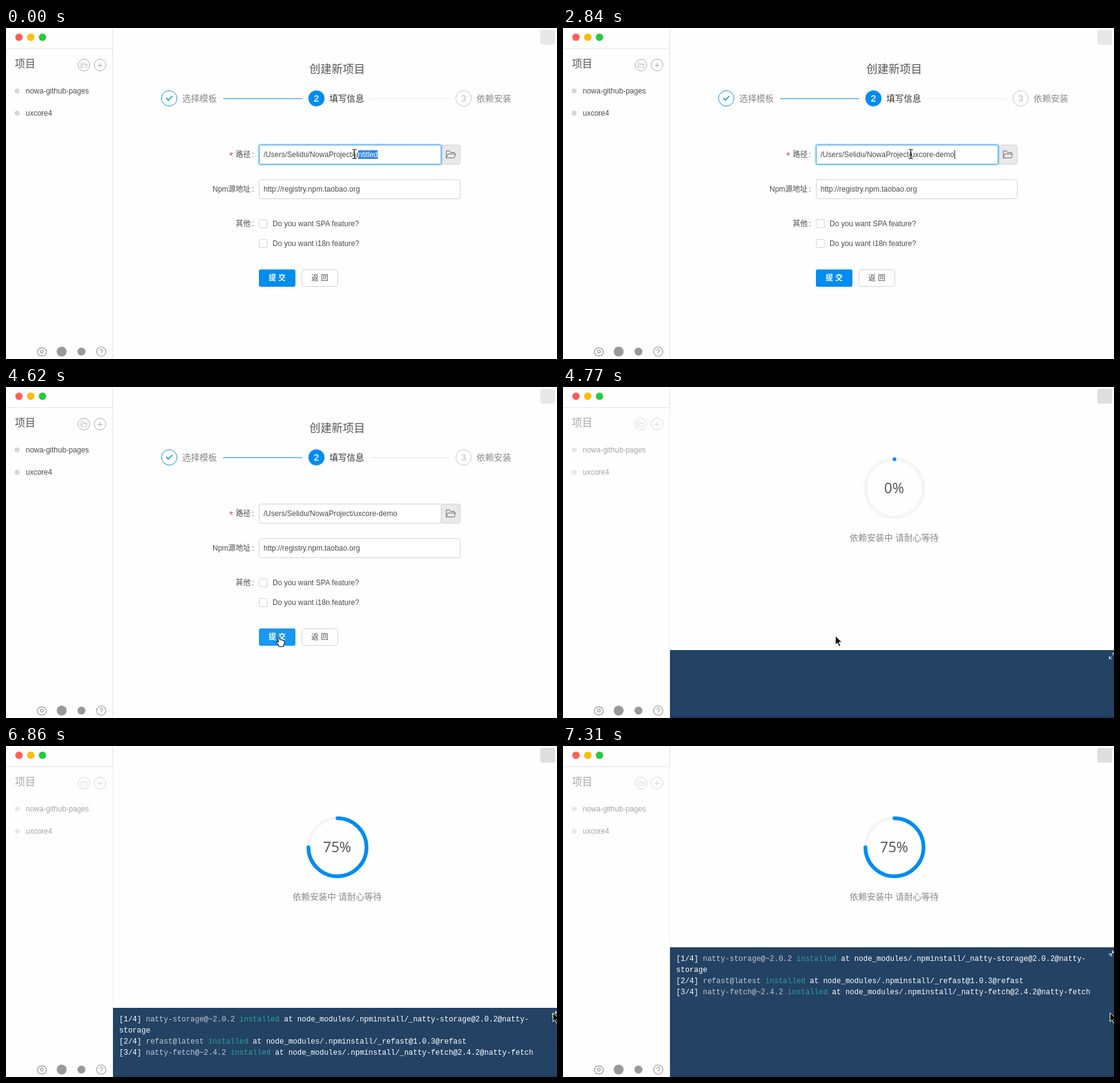
Write an HTML page that moves like this. It is 891 px wide and 536 px high and loops after 8000 ms.

```html
<!DOCTYPE html>
<html lang="zh">
<head>
<meta charset="utf-8">
<title>创建新项目</title>
<style>
  html, body { margin: 0; width: 100%; height: 100%; overflow: hidden; background: #fefefe; }
  svg { display: block; width: 100%; height: 100%; }
  text { font: 12px "Liberation Sans", "Noto Sans CJK SC", "Noto Sans CJK", sans-serif; fill: #4c4c4c; white-space: pre; }
  .step { font-size: 14px; fill: #888; }
  .num { font-size: 15px; text-anchor: middle; }
  .mid { text-anchor: middle; }
  .log, .log text { font: 12px "Liberation Mono", monospace; fill: #fff; }
  .log .pkg { fill: #c3c8cd; }
  .log .ok { fill: #35a095; }
  .line { fill: none; stroke-linecap: round; stroke-linejoin: round; }
  .box { fill: #fff; stroke: #d2d2d2; }
</style>
</head>
<body>
<svg viewBox="0 0 891 536">
  <defs>
    <path id="folder" class="line" d="M-7 5.5V-5.5H-2L-.5 -3H6V-.5M-7 5.5L-4.5 -.5H8L6 5.5Z"/>
  </defs>
  <rect width="891" height="536" fill="#fefefe"/>

  <!-- sidebar -->
  <path d="M0 33.5H172.5V0" fill="none" stroke="#e4e4e4"/>
  <circle cx="21" cy="15" r="6" fill="#ff5f57"/>
  <circle cx="40" cy="15" r="6" fill="#ffbd05"/>
  <circle cx="59" cy="15" r="6" fill="#28c93f"/>
  <g id="sidebar">
    <path d="M172.5 34V536" stroke="#e4e4e4"/>
    <text x="14.5" y="64" style="font-size:16.5px;fill:#555">项目</text>
    <g fill="none" stroke="#aaa">
      <circle cx="126" cy="60" r="9.5"/>
      <circle cx="152" cy="60" r="9.5"/>
      <use href="#folder" transform="translate(126 60) scale(.68)"/>
      <path d="M148 60.5h8M152 56.5v8"/>
    </g>
    <g fill="#d6d6d6"><circle cx="18" cy="102" r="4"/><circle cx="18" cy="138" r="4"/></g>
    <text x="32" y="106">nowa-github-pages</text>
    <text x="32" y="142">uxcore4</text>
  </g>
  <g fill="none" stroke="#999" stroke-width="1.2">
    <path class="line" d="M58 517.4l2 1.4 2.6-.1 1 2.4 1.8 1.4-.7 2.1.7 2.1-1.8 1.4-1 2.4-2.6-.1-2 1.1-2-1.1-2.6.1-1-2.4-1.8-1.4.7-2.1-.7-2.1 1.8-1.4 1-2.4 2.6.1z"/>
    <circle cx="58" cy="524" r="2.3"/>
    <circle cx="154" cy="524" r="7.5"/>
    <path class="line" d="M151.8 522.2a2.2 2.2 0 1 1 3.3 1.9q-1.1.6-1.1 1.8M154 528v.2"/>
  </g>
  <circle cx="90" cy="524" r="8" fill="#999"/>
  <circle cx="122" cy="524" r="6.5" fill="#999"/>
  <rect id="badge" x="864" y="3" width="24" height="24" rx="4"/>

  <g id="form">
    <text class="mid" x="535.5" y="73" style="font-size:18px;fill:#555">创建新项目</text>
    <path d="M351 114.5H479" stroke="#108ee9"/>
    <path d="M589 114.5H717" stroke="#e6e6e6"/>
    <circle cx="264" cy="114" r="12.5" fill="#fff" stroke="#108ee9"/>
    <path class="line" d="M259.5 113.5l3 3.5 6-6.5" stroke="#108ee9" stroke-width="1.6"/>
    <circle cx="502" cy="114" r="13" fill="#008cf0"/>
    <circle cx="740" cy="114" r="12.5" fill="#fff" stroke="#c4c4c4"/>
    <text class="num" x="502" y="119" style="fill:#fff;stroke:#fff;stroke-width:.3">2</text>
    <text class="num" x="740" y="119" style="fill:#bbb">3</text>
    <text class="step" x="285" y="119">选择模板</text>
    <text class="step" x="523" y="119" style="fill:#333">填写信息</text>
    <text class="step" x="761" y="119">依赖安装</text>

    <text x="361" y="213" style="font-size:16px;fill:#f04134">*</text>
    <text x="371.5" y="209">路径</text><text x="397.5" y="209">:</text>
    <text x="334" y="265">Npm源地址</text><text x="397.5" y="265">:</text>
    <text x="371.5" y="321">其他</text><text x="397.5" y="321">:</text>

    <rect x="703.5" y="189.5" width="31" height="31" rx="3" fill="#e9e9e9" stroke="#d2d2d2"/>
    <use href="#folder" x="719" y="204.5" stroke="#666"/>
    <rect id="glow" x="408" y="188" width="297" height="34" rx="4" fill="none" stroke="#008cf0" stroke-width="2" opacity=".25"/>
    <rect id="field" class="box" x="409.5" y="189.5" width="294" height="31" rx="2"/>
    <rect id="selection" y="198" height="14" fill="#2f86e6"/>
    <text id="path" x="416.5" y="209"><tspan id="typed"></tspan><tspan id="picked" fill="#fff"></tspan></text>
    <rect id="caret" y="198" width="1" height="14" fill="#222"/>

    <rect class="box" x="409.5" y="245.5" width="325" height="31" rx="3"/>
    <text x="416.5" y="265">http://registry.npm.taobao.org</text>
    <rect class="box" x="409.5" y="310.5" width="13" height="13" rx="1"/>
    <rect class="box" x="409.5" y="342.5" width="13" height="13" rx="1"/>
    <text x="431" y="321">Do you want SPA feature?</text>
    <text x="431" y="353">Do you want i18n feature?</text>
    <rect id="submit" x="409" y="391" width="59" height="28" rx="3"/>
    <text class="mid" x="438.5" y="409" style="fill:#fff;font-weight:bold">提 交</text>
    <rect class="box" x="478.5" y="391.5" width="58" height="27" rx="3"/>
    <text class="mid" x="507.5" y="409">返 回</text>
  </g>

  <g id="install">
    <circle cx="536" cy="164" r="47" fill="none" stroke="#f5f5f5" stroke-width="5.5"/>
    <circle id="ring" cx="536" cy="164" r="47" fill="none" stroke="#008cf0" stroke-width="6"
      stroke-linecap="round" pathLength="100" transform="rotate(-90 536 164)"/>
    <text id="percent" class="mid" x="535.5" y="172" style="font:23px 'Noto Sans',sans-serif;fill:#5a5a5a"></text>
    <text class="mid" x="535.5" y="249" style="font-size:14px;fill:#888">依赖安装中 请耐心等待</text>
    <g id="panel">
      <rect x="173" width="718" height="536" fill="#234264"/>
      <g id="log" class="log"></g>
      <g class="line" stroke="#fff">
        <path id="expand" d="M888.5 8.5l3-3M888 5h4M886.5 10.5l-3 3M883.5 10.5v3.5h3.5"/>
        <path id="collapse" d="M889 8.5l3-3M888.5 5v4h3M886.5 11l-3 3M883 10.5h4v4"/>
      </g>
    </g>
    <rect x="173" y="533" width="718" height="3" fill="#1f3a5a"/>
  </g>

  <g id="beam" class="line">
    <path d="M-3 -7.5Q0 -7.5 0 -5.5Q0 -7.5 3 -7.5M0 -6V6M-3 7.5Q0 7.5 0 5.5Q0 7.5 3 7.5M-1.5 1.5H1.5" stroke="#111" stroke-width="1.2"/>
  </g>
  <path id="arrow" d="M0 0V14.5L3.4 11.4 5.8 17 8.2 16 5.8 10.5H10.5Z" fill="#000" stroke="#fff" stroke-linejoin="round"/>
  <path id="hand" d="M-3 7Q-6 3 -6 1.500Q-4.500 0 -2.500 2.500L-4 -5.500Q-3.500 -8 -1.800 -6L-.5 -1.500Q1 -3 2 -1Q3.600 -2.200 4.500 0Q6.500 -.8 6.800 1.500Q7 5 5 7.500V9.500H-2Z"
    fill="#fff" stroke="#000" stroke-linejoin="round"/>
</svg>

<script>
const LOOP = 8000;
const BASE = '/Users/Selidu/NowaProject/';
const NAME = 'uxcore-demo';
const $ = id => document.getElementById(id);

// Tracks hold each value until the next time.
const tracks = {
  typed: [[0, 0], [1200, 2], ...Array.from({ length: 8 }, (_, i) => [1650 + i * 148.5, i + 3]), [2840, 11]],
  caret: [[0, 0], [1200, 1], [3290, 0], [3740, 1], [4180, 0]],
  focus: [[0, 1], [4330, .5], [4480, 0]],
  submit: [[0, '#008cf0'], [4030, '#1a97f0'], [4180, '#0080dc'], [4330, '#1a97f0']],
  cursor: [
    [0, ['beam', 563.5, 204]], [150, ['beam', 562.5, 204]], [3290, ['beam', 564, 204]],
    [3590, ['arrow', 545, 240]], [3740, ['arrow', 490, 330]], [3890, ['arrow', 451, 382]],
    [4030, ['hand', 443.5, 411]], [4770, ['arrow', 440.5, 403]],
    [5820, ['arrow', 454.5, 405]], [5970, ['arrow', 520, 412]], [6120, ['arrow', 660, 427]],
    [6260, ['arrow', 800, 433]], [6410, ['arrow', 872, 432]], [6560, ['arrow', 884.5, 432]]
  ],
  ring: [[0, 0], [5220, 2], [5820, 43.4], [5970, 63], [6120, 73], [6260, 75]],
  lines: [[0, 0], [5070, 1], [5220, 3]],
  panel: [[0, 426], [6860, 424], [7010, 375], [7160, 341], [7310, 326]]
};
const at = (name, t) => tracks[name].findLast(([time]) => time <= t)[1];

const packages = [
  ['natty-storage@~2.0.2', '_natty-storage@2.0.2@natty-\nstorage'],
  ['refast@latest', '_refast@1.0.3@refast'],
  ['natty-fetch@~2.4.2', '_natty-fetch@2.4.2@natty-fetch']
];
let baseline = 22;
$('log').innerHTML = packages.map(([name, target], i) => {
  const [first, rest] = target.split('\n');
  const y = baseline;
  baseline += rest ? 36 : 18;
  return `<g><text x="183" y="${y}">[${i + 1}/4] <tspan class="pkg">${name}</tspan> ` +
    `<tspan class="ok">installed</tspan> at node_modules/.npminstall/${first}</text>` +
    (rest ? `<text x="183" y="${y + 18}">${rest}</text>` : '') + '</g>';
}).join('');

const show = (id, on) => { $(id).style.display = on ? '' : 'none'; };
const set = (id, attrs) => Object.entries(attrs).forEach(([key, value]) => $(id).setAttribute(key, value));

function drawPath(t) {
  const count = at('typed', t);
  const picking = t < 1200;
  const plain = t < 150 ? 'u' : '';
  $('typed').textContent = BASE + (picking ? plain : NAME.slice(0, count));
  $('picked').textContent = picking ? 'untitled'.slice(plain.length) : '';
  $('picked').style.fill = '#fff';
  const start = 416.5 + $('typed').getComputedTextLength();
  const end = 416.5 + $('path').getComputedTextLength();
  set('selection', { x: start, width: Math.max(0, end - start) });
  set('caret', { x: Math.round(end), opacity: at('caret', t) });
  const focus = at('focus', t);
  set('glow', { opacity: focus * .25 });
  $('field').style.stroke = focus === 1 ? '#2b9bec' : focus ? '#85bbe0' : '#d2d2d2';
}

function drawInstall(t) {
  const lines = at('lines', t);
  const top = at('panel', t);
  $('percent').textContent = lines * 25 + '%';
  set('ring', { 'stroke-dasharray': `${Math.max(.01, at('ring', t))} 200` });
  set('panel', { transform: `translate(0 ${top})` });
  [...$('log').children].forEach((line, i) => { line.style.display = i < lines ? '' : 'none'; });
  show('expand', t < 6860);
  show('collapse', t >= 6860);
}

function draw(t) {
  const installing = t >= 4770;
  show('form', !installing);
  show('install', installing);
  set('sidebar', { opacity: installing ? .5 : 1 });
  set('badge', { fill: installing ? '#dedede' : '#e8e8e8' });
  set('submit', { fill: at('submit', t) });
  if (installing) drawInstall(t);
  else drawPath(t);
  const [kind, x, y] = at('cursor', t);
  for (const id of ['beam', 'arrow', 'hand']) show(id, id === kind);
  set(kind, { transform: `translate(${x} ${y})` });
}

const start = performance.now();
function tick() {
  draw((performance.now() - start) % LOOP);
  requestAnimationFrame(tick);
}
tick();
</script>
</body>
</html>
```
